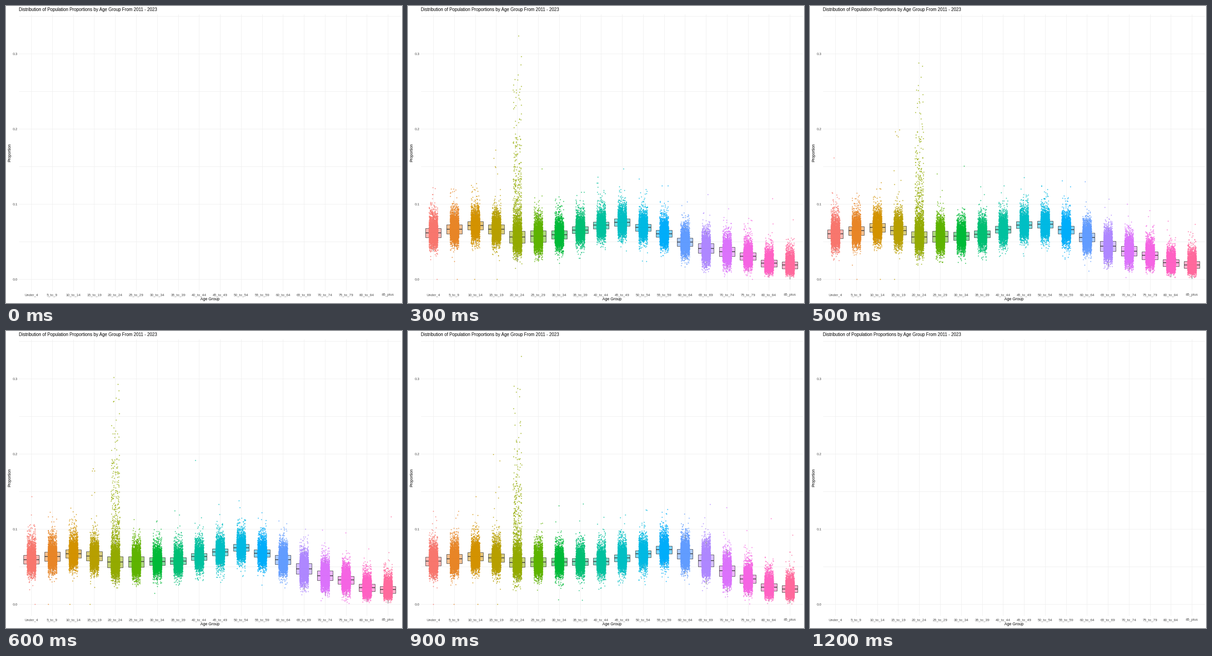
A matplotlib script that plays this animation: 864 px wide and 648 px high, repeating every 1300 ms.

```python
import numpy as np
import matplotlib.pyplot as plt
from matplotlib.animation import FuncAnimation
from matplotlib.collections import LineCollection
from matplotlib.patches import Rectangle

W, H, FRAMES = 864, 648, 13
STEP, SCALE = 45.76, 1.64  # pixels per age group, pixels per 0.001
INK, GRID, GREY = "#333333", "#EFEFEF", "#4D4D4D"
BOX, JITTER, COUNT = 0.375, 0.205, 3100
plt.rcParams["font.family"] = "Liberation Sans"

LABELS = ["Under_4"] + [f"{a}_to_{a + 4}" for a in range(5, 85, 5)] + ["85_plus"]
N = len(LABELS)
GROUPS = np.arange(N)
TEENS, STUDENTS = 3, 4

# Landmarks of the age profile, (group, median in thousandths), first and last year
FIRST = [(0, 63), (2.4, 75.5), (4, 56), (5, 58), (8, 78), (10, 65), (12, 44), (14.5, 34), (16, 20.5), (17, 18)]
LAST = [(0, 55.5), (2.4, 62), (4, 55.5), (9, 56.5), (12, 72), (13.6, 58), (15, 37.5), (15.5, 30), (16, 23), (17, 20.5)]


def px(group):
    return 55.2 + STEP * np.asarray(group)


def py(value):
    return 595.7 - SCALE * np.asarray(value)


def hcl(hue, c=100, l=65):
    """Polar CIELUV to sRGB."""
    h = np.radians(hue)
    u = c * np.cos(h) / (13 * l) + 0.1978
    v = c * np.sin(h) / (13 * l) + 0.4683
    y = ((l + 16) / 116) ** 3
    x, z = y * 9 * u / (4 * v), y * (12 - 3 * u - 20 * v) / (4 * v)
    lin = np.array([[3.2405, -1.5371, -0.4985],
                    [-0.9693, 1.8760, 0.0416],
                    [0.0556, -0.2040, 1.0572]]) @ [x, y, z]
    lin = np.clip(lin, 0, 1)
    rgb = np.where(lin > 0.0031308, 1.055 * lin ** (1 / 2.4) - 0.055, 12.92 * lin)
    return tuple(np.clip(rgb, 0, 1))


def bump(center, width):
    return np.exp(-((GROUPS - center) / width) ** 2)


def profile(t):
    """Medians: the large cohorts slide towards higher ages."""
    x, y = ((1 - t) * np.array(FIRST) + t * np.array(LAST)).T
    return np.interp(GROUPS, x, y)


def spread(t):
    """Half interquartile ranges."""
    return 4.6 + 1.4 * bump(0.5, 2) + (4.4 - 2.8 * t) * bump(4.4, 1.3) + (1.3 + 2.4 * t) * bump(13.2, 1.6)


def cloud(rng, mid, half, reach):
    """Skewed bell whose tails end near mid + reach and just above zero."""
    s = half / 0.74
    z = rng.standard_normal(COUNT)
    low = min(36, 0.9 * mid)
    bend = np.where(z > 0, reach, low) / (3.5 * s)
    return np.abs(mid + s * z * (1 + (bend - 1) * np.abs(z) / 3.5))


def values(rng, i, mid, half):
    y = cloud(rng, mid, half, 55 - 0.6 * i)
    if i == STUDENTS:
        tail = 72 + rng.exponential(50, 340)
        y[:340] = np.minimum(tail, rng.uniform(230, 335, 340))
    elif i == TEENS:
        y[1:6] = rng.uniform(140, 200, 5)
    else:
        y[1] = mid + 50 + rng.exponential(16)
    if i <= TEENS:
        y[0] = 0
    return y


fig = plt.figure(figsize=(W / 72, H / 72), dpi=72, facecolor="white")
ax = fig.add_axes([0, 0, 1, 1])
ax.set(xlim=(0, W), ylim=(H, 0))
ax.axis("off")

ax.hlines(py(range(0, 351, 50)), 28, 861, color=GRID, lw=1, zorder=1)
ax.vlines(px(GROUPS), 17.5, 621, color=GRID, lw=1, zorder=1)

for i, name in enumerate(LABELS):
    ax.text(px(i), 632, name, size=7.75, color=GREY, ha="center")
for v in range(0, 301, 100):
    ax.text(25.5, py(v) + 3, f"{v / 1000:.1f}", size=7.75, color=GREY, ha="right")
ax.text(28, 11, "Distribution of Population Proportions by Age Group From 2011 - 2023", size=9.69)
ax.text(444.5, 642, "Age Group", size=8.6, ha="center")
ax.text(7.3, 320, "Proportion", size=8.6, ha="center", va="center", rotation=90)

whiskers = ax.add_collection(LineCollection([], colors=INK, linewidths=0.8, zorder=2))
medians = ax.add_collection(LineCollection([], colors=INK, linewidths=1.5, zorder=4))
boxes, dots = [], []
for i in GROUPS:
    c = hcl(15 + 20 * i)
    boxes.append(ax.add_patch(Rectangle((px(i - BOX), 0), STEP * 2 * BOX, 0,
                                        fc=(*c, 0.5), ec=INK, lw=0.8, zorder=3)))
    dots += ax.plot([], [], "o", ms=2.25, mew=0, color=c, alpha=0.8, zorder=5)
layers = [whiskers, medians, *boxes, *dots]


def draw(k):
    shown = 0 < k < FRAMES - 1
    for a in layers:
        a.set_visible(shown)
    if not shown:
        return layers

    rng = np.random.default_rng(2011 + k)
    t = (k - 1) / (FRAMES - 3)
    sticks, bars = [], []
    for i, m, h in zip(GROUPS, profile(t), spread(t)):
        x = px(i)
        boxes[i].set_y(py(m + h))
        boxes[i].set_height(SCALE * 2 * h)
        bars.append([(px(i - BOX), py(m)), (px(i + BOX), py(m))])
        sticks.append([(x, py(m + h)), (x, py(m + 4 * h))])
        sticks.append([(x, py(m - h)), (x, py(max(m - 4 * h, 0)))])
        dots[i].set_data(px(i + rng.uniform(-JITTER, JITTER, COUNT)), py(values(rng, i, m, h)))
    whiskers.set_segments(sticks)
    medians.set_segments(bars)
    return layers


anim = FuncAnimation(fig, draw, frames=FRAMES, interval=100, repeat=True, repeat_delay=0)
plt.show()
```
